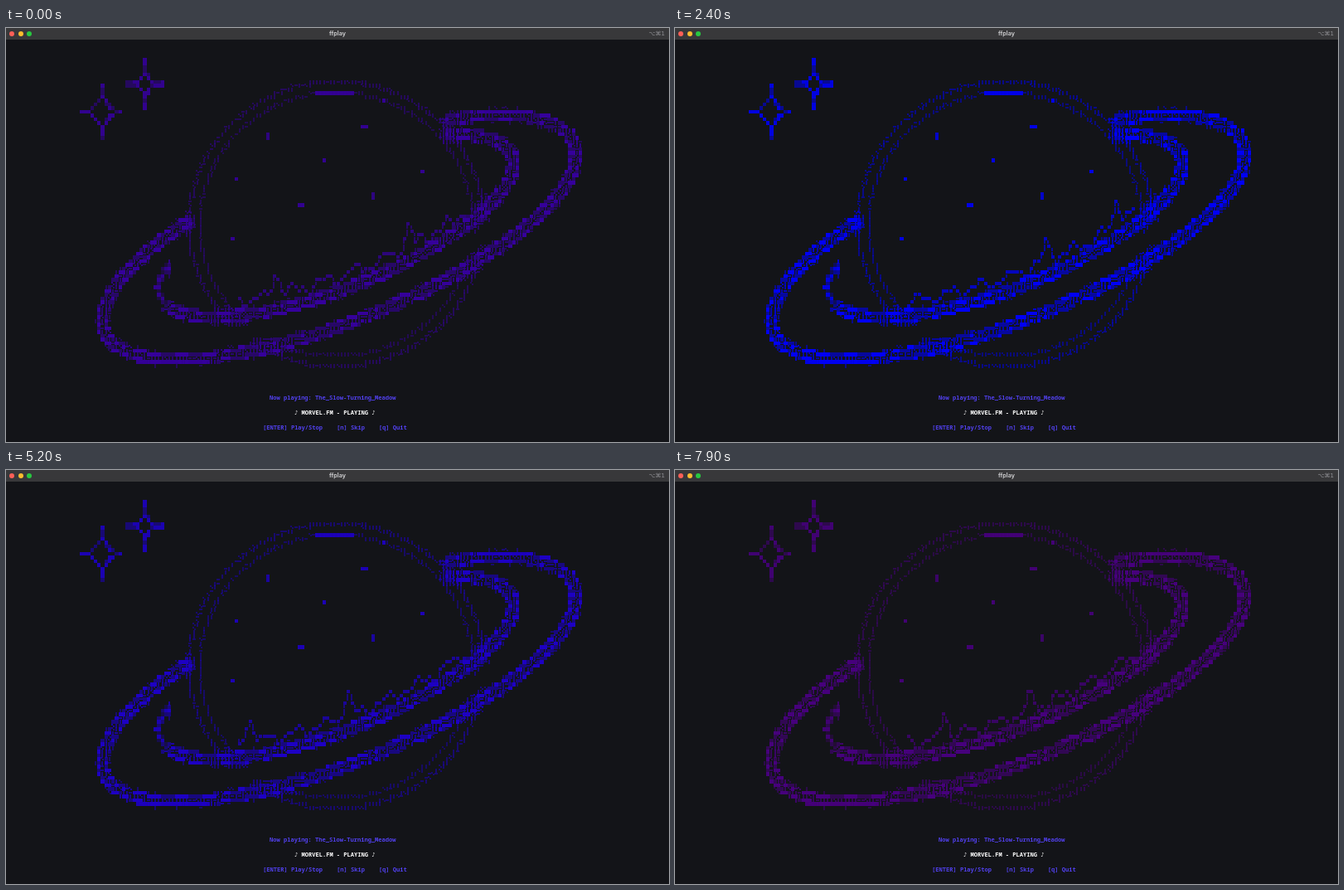
These frames come from a looping animation (800x499 px, 8000 ms). An HTML page with a canvas:

```html
<!DOCTYPE html>
<html lang="en">
<head>
<meta charset="utf-8">
<title>ffplay</title>
<style>
  html, body { margin: 0; width: 100%; height: 100%; overflow: hidden; background: #131418; }
  canvas { position: absolute; left: 0; top: 0; width: 800px; height: 499px; }
  .bar {
    position: absolute; left: 0; top: 0; width: 800px; height: 14px; background: #38383a;
    font: 600 7.2px/14px Inter, Roboto, sans-serif; color: #d4d4d6; text-align: center;
  }
  .bar i { position: absolute; top: 4px; width: 6.4px; height: 6.4px; border-radius: 50%; }
  .bar b { position: absolute; right: 5px; top: 0; font: 7px/14px "DejaVu Sans", sans-serif; color: #909094; }
  .line {
    position: absolute; height: 9px; white-space: pre; color: #5140ec;
    font: bold 7.07px/9px "Noto Sans Mono", "DejaVu Sans Mono", monospace;
  }
</style>
</head>
<body>
<canvas width="800" height="499"></canvas>
<div class="bar">ffplay
  <i style="left:4px;background:#ff5f57"></i>
  <i style="left:14.5px;background:#febc2e"></i>
  <i style="left:25px;background:#28c840"></i>
  <b>⌥⌘1</b>
</div>
<div class="line" style="left:318px;top:440.5px">Now playing: The_Slow-Turning_Meadow</div>
<div class="line" style="left:348px;top:458.5px;color:#fff">♪ MORVEL.FM - PLAYING ♪</div>
<div class="line" style="left:310px;top:476.5px">[ENTER] Play/Stop    [n] Skip    [q] Quit</div>
<script>
const W = 800, H = 499, LOOP = 8000, STEP = 100, WAVE = 1775;
const CW = 4.24, CH = 4.5, TOP = 4, COLS = 188, ROWS = 96;
const TILT = 47 * Math.PI / 180;

const view = document.querySelector('canvas').getContext('2d');
const makeLayer = () => Object.assign(document.createElement('canvas'), { width: W, height: H }).getContext('2d');
const still = makeLayer(), live = makeLayer();

let seed = 7;
function rnd() {
  seed = (seed * 16807) % 2147483647;
  return seed / 2147483647;
}

const colX = c => Math.round(c * CW);
const rowY = r => Math.round(TOP + r * CH);
const midX = c => (c + 0.5) * CW;
const midY = r => TOP + (r + 0.5) * CH;
const mix = (a, b, k) => a + (b - a) * k;

function block(c, r, w, h, alpha) {
  still.globalAlpha = alpha;
  still.fillRect(colX(c), rowY(r), colX(c + w) - colX(c), rowY(r + h) - rowY(r));
}

// Partial glyph: a vertical slit, a low bar or two dots
function glyph(c, r, alpha) {
  const x = colX(c), y = rowY(r), n = rnd();
  still.globalAlpha = alpha;
  if (n < 0.6) still.fillRect(x + 1, y, 2, 5);
  else if (n < 0.8) still.fillRect(x, y + 1, 4, 2);
  else { still.fillRect(x, y, 2, 2); still.fillRect(x + 2, y + 2, 2, 2); }
}

function eachCell(fn) {
  for (let r = 5; r < ROWS; r++)
    for (let c = 0; c < COLS; c++) fn(c, r, midX(c), midY(r));
}

// Tilted ellipses; only the arc in front of the planet and around its sides is visible.
const outer = { cx: 402, cy: 252, a: 286, b: 147, from: 130, to: 422 };
const inner = { cx: 398, cy: 238, a: 214, b: 110, from: 163, to: 410 };

function arc({ cx, cy, a, b, from, to }) {
  const points = [];
  for (let deg = from; deg <= to; deg += 0.5) {
    const t = deg * Math.PI / 180;
    points.push([cx + a * Math.cos(t), cy - b * Math.cos(t - TILT)]);
  }
  return points;
}

// Height of a ring's near side at x
const front = ({ cx, cy, a, b }, x) => cy - b * Math.cos(-Math.acos((x - cx) / a) - TILT);

function nearest(points, x, y) {
  let d = 99;
  for (const [px, py] of points) {
    if (Math.abs(px - x) < 16 && Math.abs(py - y) < 16) d = Math.min(d, Math.hypot(px - x, py - y));
  }
  return d;
}

// Signed distance to the planet's edge, shrunk by inset
const planetEdge = (x, y, inset) => (Math.hypot((x - 399) / (178 - inset), (y - 236) / (172 - inset)) - 1) * 170;

function drawPlanet(c, r, x, y) {
  const edge = planetEdge(x, y, 0);
  if (Math.abs(edge) > 20) return;
  if (y > front(inner, x) - 4 && y < front(outer, x) + 6) return;
  if (Math.abs(edge) < 2.7) glyph(c, r, 0.5);
  else if (Math.abs(planetEdge(x, y, 13)) < 2.4) glyph(c, r, 0.45);
}

function drawBand(c, r, d, slim) {
  const bright = ((c >> 2) + r) % 2 ? 0.6 : 1;
  const n = rnd();
  if (slim) {
    if (d < 4) block(c, r, 1, 1, bright * (n < 0.6 ? 0.9 : 0.5));
  } else if (d > 2.6 && d < 7.6) {
    if (n < 0.85) block(c, r, 1, 1, bright);
    else glyph(c, r, 0.8);
  } else if (d <= 2.6) {
    glyph(c, r, 0.65);
  } else if (d < 9.5 && n < 0.4) glyph(c, r, 0.5);
}

function drawSaturn() {
  const outerArc = arc(outer), innerArc = arc(inner);
  eachCell((c, r, x, y) => {
    const dOut = nearest(outerArc, x, y), dIn = nearest(innerArc, x, y);
    drawPlanet(c, r, x, y);
    drawBand(c, r, dOut, false);
    drawBand(c, r, dIn, x < 196 && y < 335);
    // Shading where the rings meet the planet
    if (Math.min(dOut, dIn) < 13 && Math.abs(planetEdge(x, y, 4)) < 10) glyph(c, r, 0.6);
  });
}

// Hollow diamond with four thin arms
function drawStar(cx, cy, hx, hy, rx, ry) {
  eachCell((c, r, x, y) => {
    const dx = Math.abs(x - cx), dy = Math.abs(y - cy);
    if (dx > rx || dy > ry) return;
    const f = (dx / hx) ** 0.85 + (dy / hy) ** 0.85;
    if (f > 0.82 && f < 1.2 || f >= 1.2 && (dx < 2.4 || dy < 2.4)) block(c, r, 1, 1, rnd() < 0.6 ? 0.9 : 0.55);
  });
}

function buildStill() {
  still.fillStyle = '#fff';
  drawSaturn();
  drawStar(116, 100.5, 18, 19, 26, 34);
  drawStar(168, 67, 12, 14, 22, 32);
  const dash = (c, r) => block(c, r, 2, 1, 0.92);
  const dot = (c, r) => block(c, r, 1, 1, 0.92);
  const post = (c, r) => block(c, r, 1, 2, 0.8);
  dash(101, 25); dash(83, 46);
  dot(90, 34); dot(118, 37); dot(65, 39); dot(64, 55); dot(107, 18);
  post(74, 27); post(104, 43);
  // Highlights on the planet's top and the ring's two ends
  block(88, 16, 11, 1, 0.92);
  block(136, 21, 13, 1, 0.92);
  block(37, 88, 21, 1, 0.92);
}

// Phase and the two tall peaks standing at that moment
const peaks = [
  [0, 326, 486], [0.03, 326, 486], [0.352, 448, 532], [0.451, 325, 428],
  [0.718, 375, 508], [0.93, 294, 413], [1, 326, 486]
];

function lift([, p, q], x) {
  const tent = m => 36 * (1 - Math.abs(x - m) / 10);
  return Math.max(7 + 6 * Math.sin(x * 0.17 + p) + 3 * Math.sin(x * 0.4 + q), tent(p), tent(q));
}

function drawRidge(t) {
  const phase = (t / WAVE) % 1;
  const i = peaks.findIndex(p => p[0] > phase);
  const a = peaks[i - 1], b = peaks[i];
  const k = (phase - a[0]) / (b[0] - a[0]);
  const rowAt = c => {
    const x = midX(c);
    const y = front(inner, x) - 10 - mix(lift(a, x), lift(b, x), k);
    return Math.round((y - TOP) / CH - 0.5);
  };
  for (let c = 66; c <= 130; c++) {
    const row = rowAt(c), step = Math.sign(rowAt(c - 1) - row);
    const count = Math.max(1, Math.abs(rowAt(c - 1) - row));
    for (let n = 0; n < count; n++) {
      live.globalAlpha = n ? 0.6 : 0.75;
      live.fillRect(colX(c), rowY(row + n * step), n ? 2 : 4, 4);
    }
  }
}

// Indigo fades to pure blue around three seconds and back again.
function hue(t) {
  const k = Math.min(1, Math.max(0, (Math.abs(t - 3000) - 1200) / 2400));
  return `rgb(${Math.round(70 * k)}, 0, ${Math.round(mix(246, 124, k))})`;
}

function render(t) {
  live.globalCompositeOperation = 'source-over';
  live.globalAlpha = 1;
  live.clearRect(0, 0, W, H);
  live.drawImage(still.canvas, 0, 0);
  live.fillStyle = '#fff';
  drawRidge(t);
  live.globalCompositeOperation = 'source-in';
  live.globalAlpha = 1;
  live.fillStyle = hue(t);
  live.fillRect(0, 0, W, H);
  view.fillStyle = '#131418';
  view.fillRect(0, 0, W, H);
  view.drawImage(live.canvas, 0, 0);
}

buildStill();
const start = performance.now();
let shown = -1;
function tick() {
  const t = Math.floor((performance.now() - start) % LOOP / STEP) * STEP;
  if (t !== shown) render(shown = t);
  requestAnimationFrame(tick);
}
tick();
</script>
</body>
</html>
```
